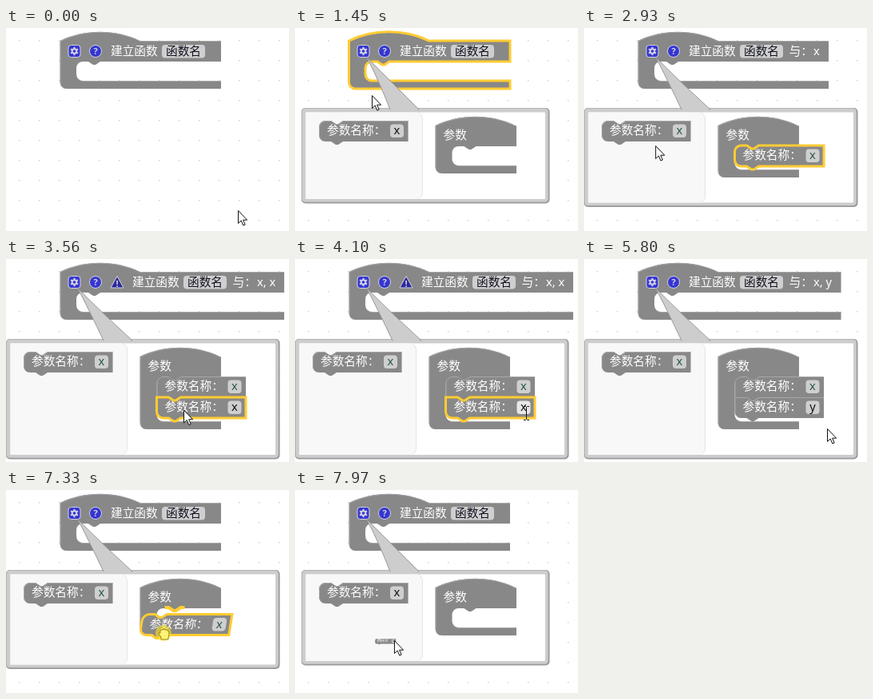
Write an HTML page with a canvas that moves like this. It is 354 px wide and 254 px high and loops after 8 s.

```html
<!DOCTYPE html>
<html lang="zh">
<head>
<meta charset="utf-8">
<style>
  html, body { margin: 0; width: 354px; height: 254px; overflow: hidden; background: #fff; }
  canvas { display: block; }
</style>
</head>
<body>
<canvas id="stage" width="354" height="254"></canvas>
<script>
const ctx = document.getElementById('stage').getContext('2d');
const LOOP = 8000, STEP = 77.45, FIRST = 70;
const FONT = '500 14.67px "Noto Sans", "Noto Sans CJK SC", "Noto Sans CJK", sans-serif';
const GREY = '#888', YELLOW = '#fc3', GREEN = '#2a5a40';

// Pointer path: time, x, y
const POINTER = [
  [0, 290, 228], [840, 85, 30], [1200, 85, 30], [1464, 96, 84], [2000, 60, 132], [2080, 60, 132],
  [2540, 224, 165], [2690, 219, 164], [2936, 89, 147], [3100, 60, 130], [3180, 60, 130],
  [3500, 222, 188], [3700, 222, 190], [4020, 289, 186], [4097, 289, 193], [5200, 289, 193],
  [5600, 304, 214], [5800, 304, 212], [5980, 304, 212], [6110, 248, 189], [6310, 248, 189],
  [6640, 122, 200], [6800, 120, 200], [7110, 219, 171], [7240, 219, 171], [7350, 198, 180],
  [7730, 82, 192], [7850, 82, 191], [7970, 124, 188]
];

// Drags: start, end, grip offset, and whether the block is torn off a stack
const DRAGS = [
  { from: 2060, to: 2670, dx: 30, dy: 16 },
  { from: 3160, to: 3535, dx: 38, dy: 14 },
  { from: 6320, to: 6775, dx: 59, dy: 15, torn: true },
  { from: 7260, to: 7855, dx: 26.5, dy: 24.5, torn: true }
];

const within = (t, a, b) => t >= a && t < b;

function pointerAt(t) {
  const i = POINTER.findIndex(key => key[0] > t);
  if (i < 0) return POINTER.at(-1).slice(1);
  const [t0, x0, y0] = POINTER[i - 1], [t1, x1, y1] = POINTER[i];
  const p = (t - t0) / (t1 - t0);
  return [x0 + (x1 - x0) * p, y0 + (y1 - y0) * p];
}

function text(str, x, y, color = '#fff', align = 'left') {
  ctx.font = FONT;
  ctx.textAlign = align;
  ctx.fillStyle = color;
  ctx.fillText(str, x, y);
}

function roundRect(x, y, w, h, r, fill) {
  ctx.beginPath();
  ctx.roundRect(x, y, w, h, r);
  ctx.fillStyle = fill;
  ctx.fill();
}

function blockBody(d, selected) {
  const path = new Path2D(d);
  ctx.fillStyle = GREY;
  ctx.fill(path);
  ctx.save();
  if (!selected) {
    ctx.clip(path);
    ctx.translate(.5, .5);
  }
  ctx.strokeStyle = selected ? YELLOW : '#a8a8a8';
  ctx.lineWidth = selected ? 3 : 1;
  ctx.stroke(path);
  ctx.restore();
}

// C-shaped block with a hat; the mouth runs from y + 26 to mouthEnd
function hatBlock(x, y, right, mouthX, mouthEnd, selected) {
  blockBody(`M${x} ${y}c30-15 70-15 100 0H${right}V${y + 26}H${mouthX + 30}l-6 4h-3l-6-4h-7
    a8 8 0 0 0-8 8V${mouthEnd - 8}a8 8 0 0 0 8 8H${right}V${mouthEnd + 10}H${x + 8}a8 8 0 0 1-8-8z`, selected);
}

function paramBlock(x, y, { name = 'x', color = GREEN, selected, squareTop, squareBottom, fieldFill = '#cfcfcf' } = {}) {
  const top = squareTop ? `M${x} ${y}h15` : `M${x} ${y + 8}a8 8 0 0 1 8-8h7`;
  const bottom = squareBottom ? `H${x}` : `H${x + 8}a8 8 0 0 1-8-8`;
  blockBody(`${top}l6 4h3l6-4H${x + 111.5}V${y + 26}H${x + 30}l-6 4h-3l-6-4${bottom}z`, selected);
  text('参数名称：', x + 10, y + 17);
  roundRect(x + 89, y + 4.5, 17, 16.5, 4, fieldFill);
  text(name, x + 97.5, y + 17, color, 'center');
}

function icon(kind, x, y, hover) {
  const blue = kind === 'warning' ? '#2a2a9a' : hover ? '#00f' : '#3636cf';
  const pale = hover ? '#fff' : '#d2d2e6';
  ctx.save();
  ctx.translate(x, y);
  ctx.beginPath();
  if (kind === 'gear') ctx.roundRect(-7.5, -7.5, 15, 15, 3.5);
  else if (kind === 'help') ctx.arc(0, 0, 7.5, 0, 7);
  else { ctx.moveTo(0, -7.5); ctx.lineTo(8, 7); ctx.lineTo(-8, 7); ctx.closePath(); }
  ctx.fillStyle = blue;
  ctx.strokeStyle = pale;
  ctx.lineWidth = 1;
  ctx.lineJoin = 'round';
  ctx.fill();
  ctx.stroke();
  if (kind === 'gear') {
    ctx.beginPath();
    ctx.arc(0, 0, 2.8, 0, 7);
    ctx.lineWidth = 2;
    ctx.stroke();
    for (let i = 0; i < 6; i++) {
      ctx.rotate(Math.PI / 3);
      ctx.fillStyle = pale;
      ctx.fillRect(-1, -5.2, 2, 2);
    }
  } else {
    ctx.font = 'bold 11px "Open Sans", sans-serif';
    ctx.textAlign = 'center';
    ctx.fillStyle = pale;
    ctx.fillText(kind === 'help' ? '?' : '!', 0, kind === 'help' ? 4 : 5.5);
  }
  ctx.restore();
}

function grid() {
  ctx.fillStyle = '#d4d4d4';
  for (let x = 16; x < 354; x += 25)
    for (let y = 15; y < 254; y += 25) ctx.fillRect(x, y, 1.5, 1.5);
}

function functionBlock(params, selected, hover) {
  const warning = params === 'x, x';
  const right = { '': 269, 'x': 306, 'x, x': 348, 'x, y': 321.5 }[params];
  const shift = warning ? 27 : 0;
  hatBlock(67.5, 16, right, 88, 66, selected);
  icon('gear', 85.5, 29, hover);
  icon('help', 112, 29);
  if (warning) icon('warning', 139, 29);
  text('建立函数', 131 + shift, 34);
  roundRect(195 + shift, 21, 54, 16.5, 4, '#cfcfcf');
  text('函数名', 200 + shift, 34, '#112');
  if (params) {
    text('与：', 256.5 + shift, 34);
    text(params, 287 + shift, 34);
  }
}

function bubble(x, right, bottom) {
  const mid = x ? 0 : 3;
  roundRect(x, 100, right - x, bottom - 100, 5, '#999');
  roundRect(x, 100, right - x - 1.5, bottom - 101.5, 5, '#b4b4b4');
  roundRect(x + 1, 101, right - x - 3, bottom - 103, 4, '#cdcdcd');
  ctx.beginPath();
  ctx.moveTo(90, 37);
  ctx.quadraticCurveTo(105, 66, 119 + mid, 102);
  ctx.lineTo(155 + mid, 102);
  ctx.quadraticCurveTo(125, 72, 90, 37);
  ctx.fillStyle = '#cdcdcd';
  ctx.fill();
  ctx.strokeStyle = '#999';
  ctx.lineWidth = 1;
  ctx.stroke();
  ctx.fillStyle = '#cdcdcd';
  ctx.fillRect(119.5 + mid, 101, 34, 3);
  roundRect(x + 5.5, 105.5, right - x - 11, bottom - 111, 1, '#fff');
  roundRect(x + 5.5, 105.5, 146.5, bottom - 111, [0, 8, 8, 0], '#e4e4e4');
  roundRect(x + 5.5, 105.5, 145.5, bottom - 111, [0, 8, 8, 0], '#f8f8f8');
}

function notchHint(x, y) {
  ctx.strokeStyle = YELLOW;
  ctx.lineWidth = 4;
  ctx.stroke(new Path2D(`M${x + 10} ${y}h5l6 4h3l6-4h5`));
}

function draggedBlock(drag, t, px, py, style) {
  const x = px - drag.dx, y = py - drag.dy;
  const p = Math.min((t - drag.from) / 200, 1);
  const tilt = drag.torn ? Math.sin(p * Math.PI * 3) * (1 - p) * .32 : 0;
  ctx.save();
  ctx.translate(x, y);
  ctx.transform(1, 0, Math.tan(tilt), 1, 0, 0);
  paramBlock(0, 0, { ...style, selected: true });
  ctx.restore();
}

// A deleted block shrinks away within 150 ms
function vanishingBlock(drag, t, style) {
  const p = (t - drag.to) / 150;
  if (p < 0 || p >= 1) return;
  const [px, py] = pointerAt(drag.to);
  ctx.save();
  ctx.translate(px - drag.dx + 56 * p, py - drag.dy + 26 * p);
  ctx.scale(1 - p, 1 - p);
  paramBlock(0, 0, style);
  ctx.restore();
}

function drawPointer(t, x, y, dragging) {
  ctx.save();
  ctx.translate(x, y);
  ctx.lineJoin = 'round';
  ctx.lineWidth = 1;
  ctx.strokeStyle = '#111';
  ctx.fillStyle = '#fff';
  if (dragging) {
    ctx.beginPath();
    ctx.arc(-1, -1, 10, 0, 7);
    ctx.fillStyle = 'rgba(255, 230, 20, .6)';
    ctx.fill();
    const hand = new Path2D('M-4 7V4l-3-4q0-2 2-1V-4q1-2 3-1q1-2 3 0q2-1 3 1q2 0 2 2V2l-1 3v2z');
    ctx.fillStyle = '#fff37a';
    ctx.strokeStyle = '#9a8410';
    ctx.fill(hand);
    ctx.stroke(hand);
  } else if (within(t, 4010, 5240)) {
    ctx.stroke(new Path2D('M-3-8.5h2.5l1 1l1-1H4M.5-7.5V7.5M-3 8.5h2.5l1-1l1 1H4'));
  } else {
    const arrow = new Path2D('M.5.5V16.5l3.7-3.5l2.6 6l2.4-1l-2.6-5.8h5z');
    ctx.fill(arrow);
    ctx.stroke(arrow);
  }
  ctx.restore();
}

function draw(time) {
  const k = Math.floor((time - FIRST + 25) / STEP);
  const t = k < 0 ? 0 : FIRST + k * STEP;
  const [px, py] = pointerAt(t);
  const drag = DRAGS.find(d => within(t, d.from, d.to));
  const [drop1, drop2] = [DRAGS[0].to, DRAGS[1].to];
  const [pull2, pull1] = [DRAGS[2], DRAGS[3]];
  const hasFirst = within(t, drop1, pull1.from);
  const hasSecond = within(t, drop2, pull2.from);
  const renamed = t >= 5150;
  const params = hasSecond ? (renamed ? 'x, y' : 'x, x') : hasFirst ? 'x' : '';

  ctx.fillStyle = '#fff';
  ctx.fillRect(0, 0, 354, 254);
  grid();
  functionBlock(params, within(t, 900, 2060), Math.hypot(px - 85, py - 29) < 8);

  if (t >= 900) {
    const wide = within(t, drop1, pull1.to);
    const x = wide ? 0 : 8;
    const bottom = within(t, drop2, pull2.to) ? 250.5 : wide ? 224 : 219.5;
    const color = wide ? GREEN : '#111';
    bubble(x, wide ? 342.5 : 318.5, bottom);
    paramBlock(x + 22, 116, { color });

    const mouthX = x + 188.5, slot1 = 147, slot2 = 173;
    const mouthEnd = hasSecond ? 203 : hasFirst ? 177 : 172;
    hatBlock(x + 167.5, 122, x + 269, mouthX, mouthEnd);
    text('参数', x + 177.5, 139);
    if (hasFirst) paramBlock(mouthX, slot1, {
      squareBottom: hasSecond,
      selected: within(t, drop1, 3160)
    });
    if (hasSecond) {
      const editing = within(t, 4390, 5150);
      paramBlock(mouthX, slot2, {
        name: t >= 5015 ? 'y' : 'x',
        color: '#111',
        squareTop: true,
        selected: within(t, drop2, 5560),
        fieldFill: editing ? '#fff' : within(t, 4010, 5240) ? '#e7e7e7' : '#cfcfcf'
      });
      if (within(t, 4390, 5015)) {
        ctx.fillStyle = '#2f7fe0';
        ctx.fillRect(281, 178, 10, 16);
        text('x', mouthX + 97.5, slot2 + 17, '#fff', 'center');
      }
    }
    vanishingBlock(pull2, t, { name: 'y', color: '#111' });
    vanishingBlock(pull1, t, { color });

    if (drag) {
      const slotY = hasFirst ? slot2 : slot1;
      const near = Math.hypot(px - drag.dx - mouthX, py - drag.dy - slotY) < 32;
      draggedBlock(drag, t, px, py, drag === pull2 ? { name: 'y', color: '#111' } : { color });
      if (near) notchHint(mouthX, slotY);
    }
  }
  drawPointer(t, px, py, drag);
}

const start = performance.now();
(function tick() {
  draw((performance.now() - start) % LOOP);
  requestAnimationFrame(tick);
})();
</script>
</body>
</html>
```
